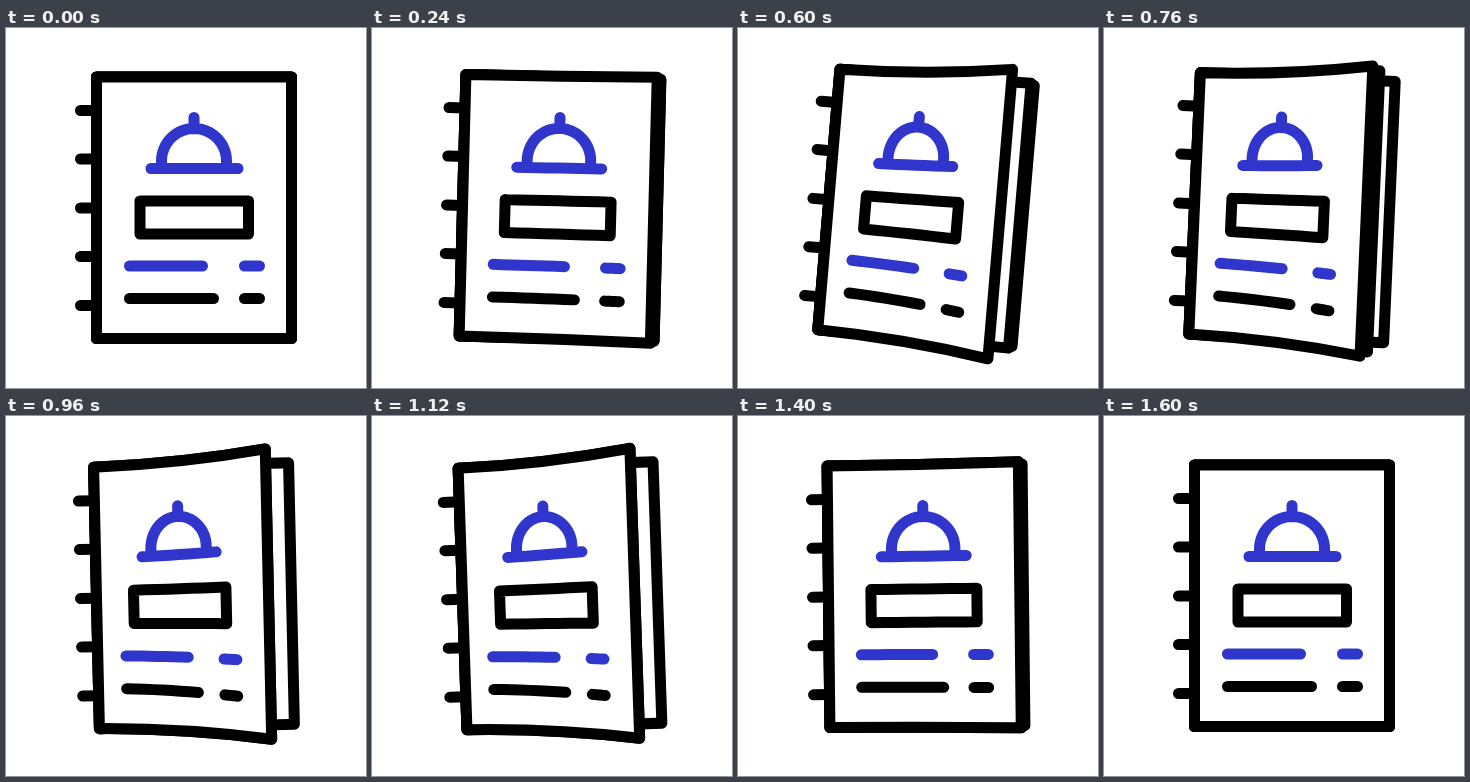
Write an HTML page that moves like this. It is 360 by 360 pixels and loops after 1720 ms.

```html
<!DOCTYPE html>
<html lang="en">
<head>
<meta charset="utf-8">
<title>Menu booklet</title>
<style>
  html, body { margin: 0; width: 100%; height: 100%; overflow: hidden; background: #fff; }
  svg { display: block; width: 100%; height: 100%; }
  path { stroke: #000; stroke-width: 11; stroke-linecap: round; stroke-linejoin: round; fill: none; }
  .sheet { fill: #fff; }
  .blue { stroke: #3036cb; }
</style>
</head>
<body>
<svg viewBox="0 0 360 360">
  <g id="book">
    <path d="M74.5 82.5h16M74.5 131h16M74.5 180h16M74.5 228.5h16M74.5 277.5h16"/>
    <path class="sheet" d="M90.5 49h195v261.5h-195z"/>
    <path class="sheet" id="page"/>
    <path class="sheet" id="cover"/>
    <path id="dark"/>
    <path class="blue" id="rows"/>
    <path class="blue" id="dish"/>
  </g>
</svg>
<script>
const LOOP = 1720, STEP = 40;
const LEFT = 90.5, WIDTH = 195, TOP = 49, BOTTOM = 310.5;
const OPEN = 23, FLARE = 0.63;
const el = id => document.getElementById(id);

const ease = (t, from, to) => {
  const u = Math.min(1, Math.max(0, (t - from) / (to - from)));
  return u * u * (3 - 2 * u);
};

// A sheet whose free edge lifts by d towards the viewer
function sheet(d) {
  const x = LEFT + WIDTH - d, mid = LEFT + (WIDTH - d) / 2;
  const f = d * FLARE, bend = f * 0.1;
  return `M${LEFT} ${TOP}Q${mid} ${TOP - bend} ${x} ${TOP - f}` +
    `V${BOTTOM + f}Q${mid} ${BOTTOM + bend} ${LEFT} ${BOTTOM}Z`;
}

// Moves a point printed on the cover along with its bend
function warp([x, y], d) {
  const w = 1.25 * (x - LEFT) / WIDTH;
  let v = (y - 184) / 127;
  if (y < 141) v = -0.34 * (y - 89) / 52;
  return [x - w * d, y + v * d * FLARE * Math.pow(w, 1.7)];
}

const trace = (points, d) =>
  'M' + points.map(p => warp(p, d).map(n => n.toFixed(2)).join(' ')).join('L');

function line(x1, y1, x2, y2) {
  return Array.from({ length: 9 }, (_, i) =>
    [x1 + (x2 - x1) * i / 8, y1 + (y2 - y1) * i / 8]);
}

const dome = Array.from({ length: 33 }, (_, i) => {
  const a = Math.PI * (1 + i / 32);
  return [188 + 32.5 * Math.cos(a), 133 + 32.5 * Math.sin(a)];
});

const art = {
  dark: [
    [...line(134, 173, 242.5, 173), ...line(242.5, 206, 134, 206), [134, 173]],
    line(123.5, 270.5, 207.5, 270.5),
    line(238.5, 270.5, 253.5, 270.5)
  ],
  rows: [line(123.5, 238, 196.5, 238), line(238.5, 238, 253.5, 238)],
  dish: [
    [[155.5, 138], ...dome, [220.5, 138]],
    line(145, 140.5, 232, 140.5),
    line(188, 89.5, 188, 99)
  ]
};

function draw(t) {
  const angle = 5 * ease(t, 60, 560) - 7 * ease(t, 560, 1060) + 2 * ease(t, 1060, 1600);
  const shut = 1 - ease(t, 1090, 1505);
  const lift = OPEN * ease(t, 135, 550) * shut;
  const follow = OPEN * ease(t, 500, 915) * shut;

  el('book').setAttribute('transform', `rotate(${angle} 188 180)`);
  el('page').setAttribute('d', sheet(follow));
  el('cover').setAttribute('d', sheet(lift));
  for (const id in art) {
    el(id).setAttribute('d', art[id].map(p => trace(p, lift)).join(''));
  }
}

const start = performance.now();
function tick() {
  const t = (performance.now() - start) % LOOP;
  draw(Math.floor(t / STEP) * STEP);
  requestAnimationFrame(tick);
}
tick();
</script>
</body>
</html>
```
